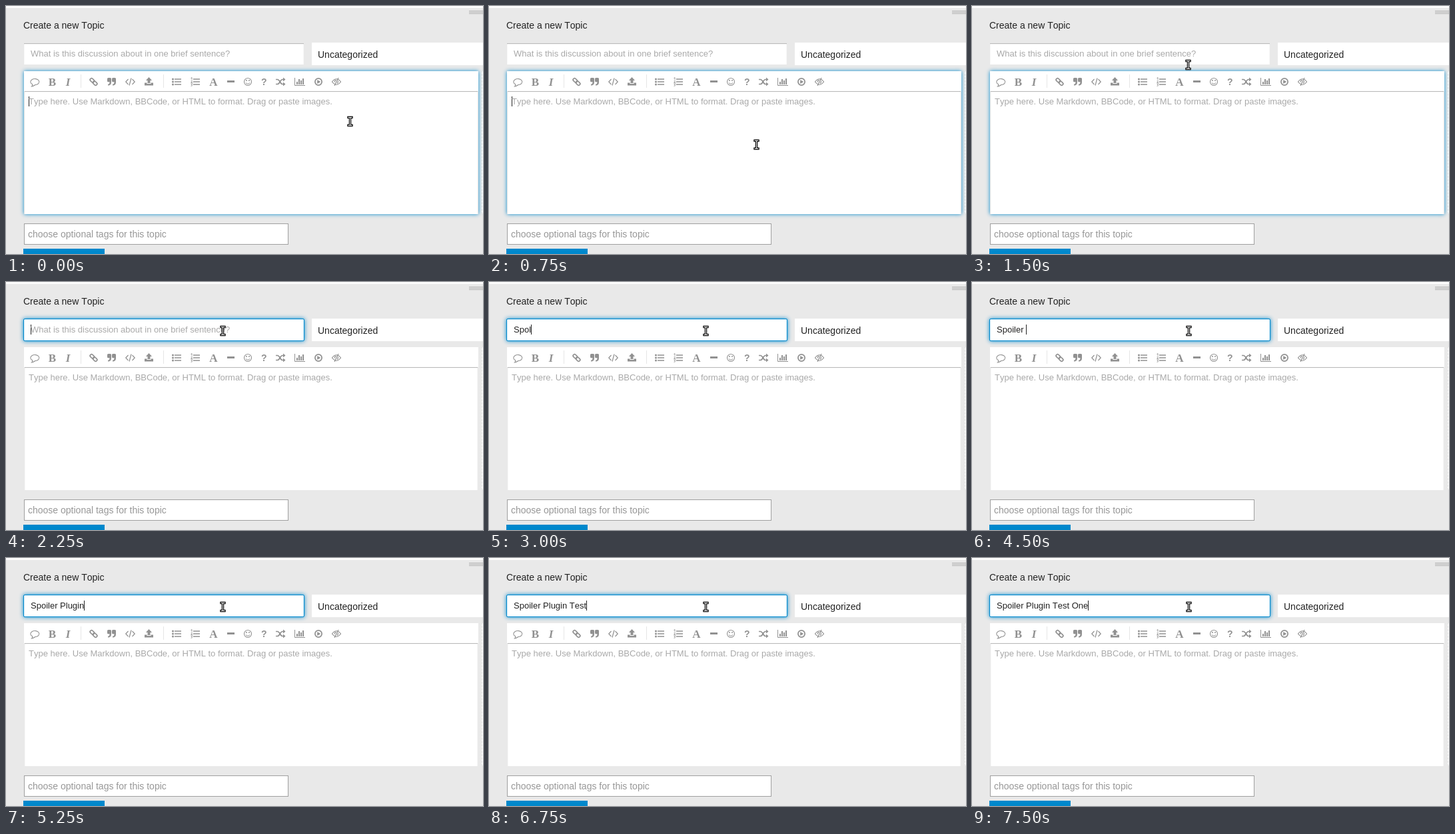
An HTML page for the animation above (8 s loop, 716 by 373 pixels).

```html
<!DOCTYPE html>
<html lang="en">
<head>
<meta charset="utf-8">
<title>Create a new Topic</title>
<style>
  html, body { margin: 0; width: 100%; height: 100%; overflow: hidden; }
  body { position: relative; background: #e9e9e9; color: #222; font: 14px/16px "Liberation Sans", Arial, sans-serif; font-kerning: none; }
  body > * { position: absolute; box-sizing: border-box; white-space: pre; }
  .small { font-size: 13px; line-height: 15px; }
  .hint { color: #a9a9a9; }
  .caret { display: inline-block; width: 1px; height: 15px; margin-right: -1px; background: #222; vertical-align: top; }
  .topline { left: 0; top: 0; width: 716px; height: 3px; background: #fdfdfd; }
  .grip { left: 695px; top: 7px; width: 21px; height: 5px; background: repeating-linear-gradient(#b5b5b5 0 1px, #e9e9e9 1px 2px); }
  .heading { left: 26px; top: 21px; }
  .title { left: 26px; top: 55px; width: 422px; height: 34px; border: 1px solid #e9e9e9; background: #fff; box-shadow: inset 0 1px 1px rgba(0,0,0,.3); }
  .title.focus { border-color: #08c; border-radius: 2px; box-shadow: 0 0 6px #08c, inset 0 0 1px #08c; }
  #entry { left: 37px; top: 64px; }
  .category { left: 459px; top: 55px; width: 257px; height: 34px; padding: 10px 9px; background: #fff; }
  .editor { left: 27px; top: 98px; width: 682px; height: 215px; background: #fff; }
  .editor.focus { box-shadow: 0 0 6px #08c; }
  .area { left: 27px; top: 128px; width: 682px; height: 185px; border: solid #e9e9e9; border-width: 0 1px; box-shadow: inset 0 1px 1px rgba(0,0,0,.3); }
  #body { left: 34px; top: 136px; }
  .preview { left: 714px; top: 97px; width: 20px; height: 216px; border: 1px dashed #e9e9e9; background: #fff; }
  .tags { left: 27px; top: 327px; width: 397px; height: 32px; padding: 7px 5px; border: 1px solid #a0a0a0; background: #fff; color: #979797; }
  .create { left: 26px; top: 365px; width: 122px; height: 8px; background: #08c; }
  svg { left: 0; top: 0; width: 716px; height: 373px; }
  .fill { fill: #919191; stroke: none; }
  .serif { font: bold 17px "Liberation Serif", serif; }
</style>
</head>
<body>
<div class="topline"></div>
<div class="grip"></div>
<div class="heading">Create a new Topic</div>
<div class="title" id="title"></div>
<div class="category">Uncategorized</div>
<div class="preview"></div>
<div class="editor" id="editor"></div>
<div class="area"></div>
<div class="small hint" id="body"><i class="caret" id="bodyCaret"></i>Type here. Use Markdown, BBCode, or HTML to format. Drag or paste images.</div>
<div class="small" id="entry"><span id="typed"></span><i class="caret" id="titleCaret"></i><span class="hint" id="hint">What is this discussion about in one brief sentence?</span></div>
<div class="tags">choose optional tags for this topic</div>
<div class="create"></div>

<svg viewBox="0 0 716 373" fill="none" stroke="#919191" stroke-width="1.4">
  <path d="M112.5 103V123M236.5 103V123" stroke="#e6e6e6" stroke-width="1"/>
  <!-- speech bubble -->
  <path d="M40 117.900A6.500 4.500 0 1 1 44 118.500Q41.500 120.500 38.500 121Q39.700 119.500 40 117.900Z" stroke-width="1.1"/>
  <g class="fill serif" text-anchor="middle">
    <text x="69.5" y="120">B</text>
    <text x="93" y="120" font-style="italic">I</text>
    <text x="311.5" y="120">A</text>
  </g>
  <!-- link -->
  <g transform="translate(131.500 114) rotate(45)" stroke-width="1.700">
    <rect x="-6.500" y="-2.200" width="7" height="4.400" rx="2"/>
    <rect x="-.5" y="-2.200" width="7" height="4.400" rx="2"/>
  </g>
  <!-- quote -->
  <g class="fill">
    <path id="mark" d="M153.5 108H156.5Q158 108 158 109.5V114.5Q158 119.5 153 119.5V117.8Q155.5 117.8 155.5 114.2H153.5Q152 114.2 152 112.7V109.5Q152 108 153.5 108Z"/>
    <use href="#mark" x="7"/>
  </g>
  <path d="M183.5 110L179.8 114L183.5 118M189.5 110L193.2 114L189.5 118M188 108.5L185 119.5" stroke-width="1.2"/>
  <!-- upload -->
  <path class="fill" d="M214.5 107L219 112H216.5V116H212.5V112H210ZM208 115.5H211.5V117H217.5V115.5H221V119.5H208Z"/>
  <!-- lists -->
  <path d="M253 110H263M253 114H263M253 118H263M281 110H291M281 114H291M281 118H291" stroke-width="1.6"/>
  <g class="fill">
    <circle cx="250.5" cy="110" r="1.5"/><circle cx="250.5" cy="114" r="1.5"/><circle cx="250.5" cy="118" r="1.5"/>
  </g>
  <path d="M277.5 108.5L279 107.5V111M277.5 113Q280 111.8 279.5 113.5L277.5 115.5H280.5M277.5 117.3H280L278.8 118.5Q281 120.3 277.5 120.3" stroke-width=".9"/>
  <path d="M332 113.5H343" stroke-width="3"/>
  <!-- smile -->
  <circle cx="363" cy="114" r="5.5" stroke-width="1.1"/>
  <path d="M360 115.5Q363 119 366 115.5" stroke-width="1.1"/>
  <g class="fill">
    <circle cx="361" cy="112" r="1"/><circle cx="365" cy="112" r="1"/>
    <text x="387.3" y="119" text-anchor="middle" style="font:bold 14px 'Liberation Sans',Arial,sans-serif">?</text>
  </g>
  <!-- shuffle -->
  <path d="M405 110.5H407.5C411 110.5 411.5 117.5 415 117.5H417M405 117.5H407.5C411 117.5 411.5 110.5 415 110.5H417" stroke-width="1.700"/>
  <path class="fill" d="M416 107.5L419.5 110.5L416 113.5ZM416 114.5L419.5 117.5L416 120.5Z"/>
  <!-- chart -->
  <path d="M433.5 108V119.5H449" stroke-width="1"/>
  <path d="M437 118V114M440 118V110M443 118V112M446 118V109" stroke-width="2"/>
  <!-- play -->
  <circle cx="469" cy="114" r="5.1" stroke-width="1.75"/>
  <path class="fill" d="M467.2 111L472.2 114L467.2 117Z"/>
  <!-- crossed eye -->
  <path d="M489.5 114Q496 105.5 502.5 114Q496 122.5 489.5 114ZM499 108L493 120" stroke-width="1.2"/>
  <path d="M495.5 111.3Q493 112 493.3 114.5M498.5 112.5Q499 115 497 116.5" stroke-width="1.2"/>
  <!-- text pointer -->
  <g id="pointer" stroke-linecap="square">
    <path d="M-2.5 -6H2.5M0 -6V6M-2.5 6H2.5" stroke="#000" stroke-width="3.4"/>
    <path d="M-2.5 -6H2.5M0 -6V6M-2.5 6H2.5" stroke="#fff" stroke-width="1"/>
  </g>
</svg>

<script>
  const LOOP = 8000, STEP = 750, TITLE_FOCUS = 3;
  const stops = [[516.5, 173.5], [401.5, 208.5], [324.5, 88.5], [325.5, 73.5]];
  const entries = ["Spol", "Spoil", "Spoiler ", "Spoiler Plugin", "Spoiler Plugin ", "Spoiler Plugin Test", "Spoiler Plugin Test One"];
  const el = id => document.getElementById(id);
  const show = (id, on) => { el(id).style.display = on ? "" : "none"; };
  const start = performance.now();
  let shown = -1;

  function draw(step) {
    const inTitle = step >= TITLE_FOCUS;
    const text = entries[step - TITLE_FOCUS - 1] || "";
    el("title").classList.toggle("focus", inTitle);
    el("editor").classList.toggle("focus", !inTitle);
    el("typed").textContent = text;
    show("hint", !text);
    show("titleCaret", inTitle);
    show("bodyCaret", step < 2);
    const [x, y] = stops[Math.min(step, stops.length - 1)];
    el("pointer").setAttribute("transform", `translate(${x} ${y})`);
  }

  function tick() {
    const step = Math.floor((performance.now() - start) % LOOP / STEP);
    if (step !== shown) draw(shown = step);
    requestAnimationFrame(tick);
  }
  tick();
</script>
</body>
</html>
```
